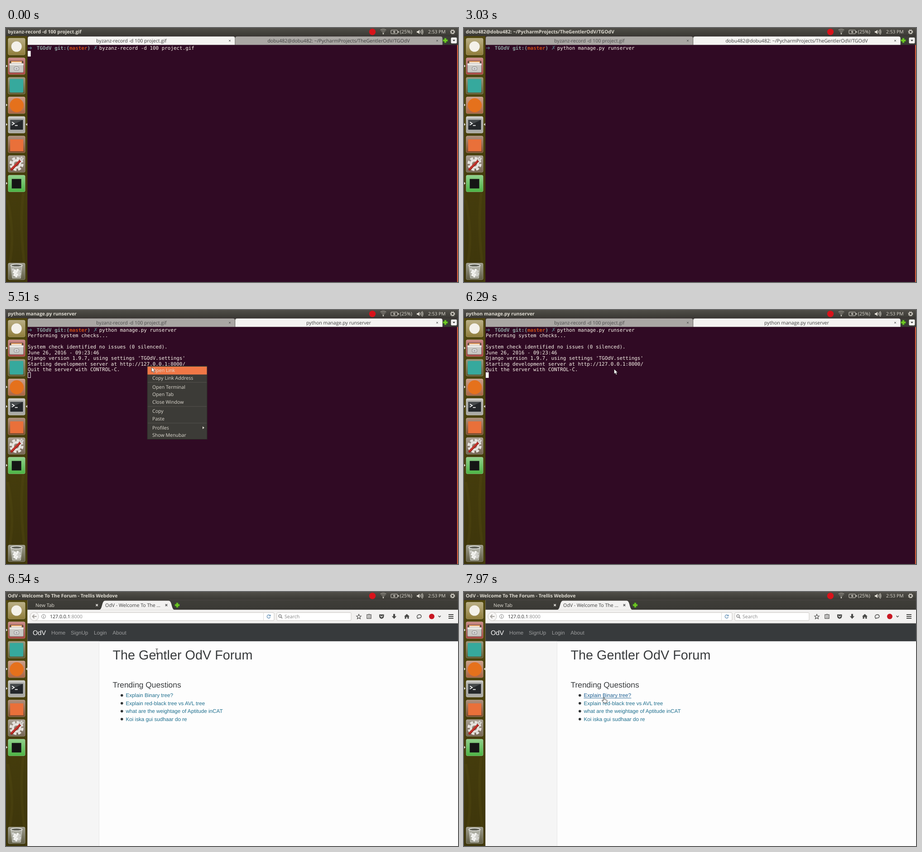
Animation of 998x561 px, one loop 8 s. Source, as an HTML page:

```html
<!DOCTYPE html>
<html lang="en">
<head>
<meta charset="utf-8">
<title>Desktop recording</title>
<style>
html, body { margin: 0; width: 100%; height: 100%; overflow: hidden; background: #300a24; }
svg { display: block; width: 100%; height: 100%; }
text { white-space: pre; text-rendering: geometricPrecision; }
.u { font: 10.6px "Open Sans", sans-serif; }
.b { font: bold 10.5px "Open Sans", sans-serif; fill: #dfdbd2; }
.m { font: 10.92px "DejaVu Sans Mono", monospace; fill: #fbf6ec; }
.s { font: 12px "DejaVu Sans", sans-serif; fill: #54747f; }
.h { font: 11.69px "Liberation Sans", sans-serif; fill: #373a3c; }
</style>
</head>
<body>
<svg id="stage" viewBox="0 0 998 561" preserveAspectRatio="none"></svg>
<script>
const LOOP = 8000, CELL = 6.5755, ROW = 12.42, LEFT = 48;
const PATH = 'dobu482@dobu482: ~/PycharmProjects/TheGentlerOdV/TGOdV';
const RECORD = 'byzanz-record -d 100 project.gif';
const SERVE = 'python manage.py runserver';

const rect = (x, y, w, h, fill, more = '') =>
  `<rect x="${x}" y="${y}" width="${w}" height="${h}" fill="${fill}" ${more}/>`;
const disc = (x, y, r, fill, more = '') => `<circle cx="${x}" cy="${y}" r="${r}" fill="${fill}" ${more}/>`;
const path = (d, fill, more = '') => `<path d="${d}" fill="${fill}" ${more}/>`;
const line = (d, color, w = 1, more = '') => path(d, 'none', `stroke="${color}" stroke-width="${w}" ${more}`);
const text = (x, y, str, cls, more = '') => `<text x="${x}" y="${y}" class="${cls}" ${more}>${str}</text>`;
const group = (id, body, more = '') => `<g id="${id}" ${more}>${body}</g>`;
const at = (x, y, body) => `<g transform="translate(${x} ${y})">${body}</g>`;
const cross = (x, y, r, color, w) =>
  line(`M${x - r} ${y - r}l${2 * r} ${2 * r}m0 ${-2 * r}l${-2 * r} ${2 * r}`, color, w);
const plus = (x, y) => line(`M${x - 5.5} ${y}h11m-5.5 -5.5v11`, '#3f8f1c', 4.8) +
  line(`M${x - 4.7} ${y}h9.4m-4.7 -4.7v9.4`, '#74c924', 3);
const gear = (x, y, r, color, w, dash) => disc(x, y, r, 'none', `stroke="${color}" stroke-width="${w}"`) +
  disc(x, y, r + w, 'none', `stroke="${color}" stroke-width="${w}" stroke-dasharray="${dash}"`);
const vgrad = (id, a, b) => `<linearGradient id="${id}" x1="0" y1="0" x2="0" y2="1">
  <stop offset="0" stop-color="${a}"/><stop offset="1" stop-color="${b}"/></linearGradient>`;

const defs = `<defs>${vgrad('bar', '#504e48', '#3a3934')}${vgrad('dock', '#51480f', '#3d350b')}
  ${vgrad('gloss', '#ffffff66', '#ffffff08')}${vgrad('head', '#3f3e39', '#3a3935')}</defs>`;

function panel() {
  return rect(0, 0, 998, 17.6, 'url(#bar)') +
    text(4, 12.4, '', 'b', 'id="title"') +
    disc(809, 8.6, 7.2, '#d8131b') +
    [3, 5.5, 8].map(r => line(`M${833 - r * .8} ${12.5 - r}q${r * .8} ${-r * .45} ${r * 1.6} 0`, '#a9a59c', 1.2)).join('') +
    disc(833, 12.5, 1.4, '#dfdbd2') +
    rect(850, 4.7, 14.5, 8, 'none', 'stroke="#dfdbd2" rx="1"') + rect(865.5, 7, 1.8, 3.4, '#dfdbd2') +
    path('M858 5.6l-4 3.6h3l-1 2.9 4.5-3.9h-3z', '#dfdbd2') +
    text(869.8, 12.4, '(25%)', 'u', 'fill="#dfdbd2"') +
    path('M907 7h2.5l3.5-3v9.5l-3.5-3H907z', '#dfdbd2') +
    line('M914.8 6.2q2 2.5 0 5m2-7q3.4 4.5 0 9m2-10.5q4 6 0 12', '#dfdbd2', 1.1) +
    text(932, 12.4, '2:53 PM', 'u', 'fill="#dfdbd2" style="font-size:10.3px"') +
    gear(986, 8.6, 3.2, '#dfdbd2', 1.5, '1.9 1.79');
}

// Launcher icons are drawn in a 38 by 38 box.
const tile = (y, fill, body) => at(4.2, y, rect(.5, .5, 37.5, 37, fill, 'rx="3"') +
  rect(.5, .5, 37.5, 37, 'url(#gloss)', 'rx="3" stroke="#ffffff55" stroke-width=".8"') + body);

function launcher() {
  const files = rect(4, 7, 30, 9, '#5a4a40', 'rx="2"') + rect(7, 8, 24, 6, '#f3a25c') +
    rect(8, 10, 22, 3, '#f7efe2') + rect(3.5, 13, 31, 20, '#c9c8c4', 'rx="2" stroke="#77736d"') +
    rect(3.5, 13, 31, 4, '#e9e8e5') + rect(14, 21, 10, 7, '#eee', 'rx="1" stroke="#777"') + rect(16.5, 24, 5, 1.7, '#777');
  const shell = rect(3, 6, 32.5, 26, '#cfcfca', 'rx="2" stroke="#888"') + rect(5, 8, 28.5, 22, '#24272a') +
    path('M5 8h28.5L5 22z', '#45494b') + line('M9 13l5 3.3-5 3.3M15.5 20.5h6', '#fff', 1.7);
  const tools = gear(19, 19, 8, '#e6e3df', 5, '6.4 3.81') +
    line('M8 31L27 12', '#a51f1a', 5, 'stroke-linecap="round"') + line('M8 30.5L25 13', '#d9473d', 1.5) +
    line('M33.5 5.5q-1 6-5.5 5.5-2-4 3.5-7.5', '#d8d6d2', 3);
  let balls = '';
  for (let i = 0; i < 13; i++)
    balls += disc(11.5 + i * 5 % 16, 15 + (i * 7 % 13) * 1.2, 2.7, i % 3 ? '#f1f1ee' : '#d0d0cb');
  const bin = path('M7 6h24l-3 28H10z', '#b9bab2aa', 'stroke="#d4d5cf" stroke-width="1"') + balls +
    `<ellipse cx="19" cy="6" rx="12.5" ry="3" fill="#5d5e55" stroke="#e8e8e3" stroke-width="1.5"/>`;
  const mark = y => path(`M0 ${y - 3}l3.4 3-3.4 3z`, '#d9d6cc');
  return rect(0, 17.6, 47.5, 543.4, 'url(#dock)') +
    line('M4 380Q20 460 8 520M38 365Q28 450 46 560', '#66591a', 6, 'opacity=".18"') +
    tile(22, '#8d7a36', disc(19, 19, 11.5, '#f4f1ea')) +
    tile(65.2, '#a8403c', files) +
    tile(108.4, '#5a552c', rect(4, 4, 30, 30, '#36a99d', 'rx="2"')) +
    tile(151.6, '#a9603d', disc(19.5, 19, 15.3, '#e5711c')) +
    tile(194.8, '#aaa9a3', shell) +
    tile(238, '#7a4728', rect(5, 8, 29, 26, '#e9703a')) +
    tile(281.2, '#72624f', tools) +
    tile(324.4, '#47b23f', rect(8.5, 9, 21, 21, '#151515')) +
    tile(518.6, '#5d5a41', bin) +
    [84, 170, 213, 343].map(mark).join('') + path('M47 -3l-3.4 3 3.4 3z', '#e4e1d8', 'id="focus"');
}

const rowY = r => 48 + r * ROW;
const colX = c => LEFT + c * CELL;
const mono = (c, r, str, more) => text(colX(c), rowY(r), str, 'm', more);
const bold = color => `style="font-weight:bold;fill:${color}"`;

function terminal() {
  const tab = (x, w, id) => path(`M${x} 37.2v-14.5q0-4 4-4h${w - 8}q4 0 4 4v14.5z`, '#aaa7a4', `id="${id}"`);
  const output = ['Performing system checks...', '', 'System check identified no issues (0 silenced).',
    'June 26, 2016 - 09:23:46', "Django version 1.9.7, using settings 'TGOdV.settings'",
    'Starting development server at http://127.0.0.1:8000/', 'Quit the server with CONTROL-C.'];
  return rect(47.5, 17.6, 951, 543.4, '#300a24') + rect(47.5, 17.6, 951, 19.7, 'url(#head)') +
    tab(48, 457.5, 'tabA') + tab(506.2, 457.5, 'tabB') +
    text(276.8, 32, RECORD, 'u', 'id="labelA" text-anchor="middle"') +
    text(734.5, 32, PATH, 'u', 'id="labelB" text-anchor="middle" fill="#3c3c3c"') +
    cross(494, 28, 1.9, '#555', 1) + cross(952, 28, 1.9, '#555', 1) + plus(970, 27.5) +
    rect(982.5, 21, 13, 13, '#f4f3f1', 'rx="2"') + path('M986 26h6l-3 3.5z', '#444') +
    rect(996, 37.5, 2, 524, '#d9623c') +
    text(LEFT, rowY(0), '➜', 's') + mono(3, 0, 'TGOdV', bold('#8ba3a0')) + mono(9, 0, 'git:(', bold('#8ba3a0')) +
    mono(14, 0, 'master', bold('#cb4b16')) + mono(20, 0, ')', bold('#8ba3a0')) + text(colX(22), rowY(0), '✗', 's') +
    mono(24, 0, '', 'id="command"') +
    group('check', mono(0, 1, output[0])) +
    group('output', output.slice(1).map((s, i) => mono(0, i + 2, s)).join('')) +
    line(`M${colX(31)} 124.3h${CELL * 22}`, '#fbf6ec', .8, 'id="underline"') +
    rect(0, 0, CELL, ROW, '#fff', 'id="block"');
}

function menu() {
  const items = ['Open Link', 'Copy Link Address', '', 'Open Terminal', 'Open Tab', 'Close Window', '',
    'Copy', 'Paste', '', 'Profiles', 'Show Menubar'];
  let y = 125, body = rect(312, 123.5, 132, 162, '#3c3b37', 'stroke="#2a2925"') +
    rect(312.5, 125, 131, 17.5, '#f07746', 'id="hot"');
  for (const item of items) {
    if (item) body += text(323, y + 12.2, item, 'u', 'fill="#dfdbd2"');
    else body += line(`M313 ${y + 2}h130`, '#55534d');
    y += item ? 16.4 : 4;
  }
  return body + path('M434 257l4 3-4 3z', '#dfdbd2');
}

function browser() {
  const ink = '#4a4a48';
  const field = (x, w) => rect(x, 45.5, w, 17.5, '#fff', 'rx="2" stroke="#c4c1bd" stroke-width=".9"');
  const nav = ['Home', 'SignUp', 'Login', 'About'].map((s, i) =>
    text([100, 143, 194, 235.3][i], 94, s, 'h', `id="nav${i}"`)).join('');
  const topics = ['Explain Binary tree?', 'Explain red-black tree vs AVL tree',
    'what are the weightage of Aptitude inCAT', 'Koi iska gui sudhaar do re'];
  const list = topics.map((s, i) => disc(255.8, 228.2 + i * 17.53, 2.8, '#2f3234') +
    text(264.4, 232.2 + i * 17.53, s, 'h', `id="topic${i}" style="fill:#20708f"`)).join('');
  const icons = line('M779 49.3l1.5 3.5 3.7.3-2.8 2.5.9 3.7-3.3-2-3.3 2 .9-3.7-2.8-2.5 3.7-.3z', ink, 1.2) +
    rect(797, 50, 9, 8.5, 'none', `stroke="${ink}" stroke-width="1.3"`) + line('M799 53h5.5m-5.5 3h5.5M801.5 48v2', ink, 1.2) +
    path('M824 49.5h10.5v4q-.5 5-5.3 5.7-4.7-.7-5.2-5.7z', ink) + line('M826.5 52.5l2.7 2.7 2.7-2.7', '#fff', 1.4) +
    path('M855 48.5h4v5h3.2l-5.2 5.7-5.2-5.7h3.2z', ink) +
    path('M885 48.5l6 5.5h-1.5v5h-3.2v-3.5h-2.6v3.5h-3.2v-5H879z', ink) +
    line('M909 58.5q-3.5-5 1-8 6-2 7 3-.5 4.5-6 4z', ink, 1.4) +
    disc(940, 54, 6, '#c81722') + line('M954.5 52.5l2.7 2.7 2.7-2.7', ink, 1.4) +
    line('M977 50h11m-11 4h11m-11 4h11', ink, 2);
  const page = rect(47.5, 69.3, 951, 39.5, '#373a3c') + rect(47.5, 108.8, 158, 452.2, '#f5f5f5') +
    rect(205.2, 108.8, .8, 452.2, '#e4e4e4') +
    text(59, 95.2, 'OdV', 'h', 'style="font-size:14.6px;fill:#fff"') + nav +
    text(235.5, 149, 'The Gentler OdV Forum', 'h', 'style="font-size:28.8px"') +
    text(235.5, 211, 'Trending Questions', 'h', 'style="font-size:17.4px"') + list +
    line('M264.4 234.3h105', '#1d5f92', .9, 'id="hover"') +
    group('status', rect(47.5, 547, 122, 15, '#f2f1f0', 'stroke="#bbb" stroke-width=".8"') +
      text(52, 557.5, '127.0.0.1:8000/login', 'u', 'fill="#333"'));
  return rect(47.5, 17.6, 951, 543.4, '#fdfdfd') + rect(47.5, 17.6, 951, 22, 'url(#head)') +
    text(65, 32.8, 'New Tab', 'u', 'fill="#dfdbd2"') + cross(200.7, 29, 2.2, '#f0eee9', 1.5) +
    path('M206 39.4C213 39 211 19.3 219 19.3H359C367 19.3 365 39 372 39.4z', '#f2f1f0') +
    text(219, 32.8, '', 'u', 'id="tabName" fill="#3c3c3c"') + cross(354, 29, 2.2, '#555', 1.5) + plus(378, 29) +
    rect(47.5, 39.3, 951, 29.4, '#f2f1f0') + rect(47.5, 68.6, 951, .7, '#b8b6b3') + field(62, 530) +
    disc(62.5, 54, 9.5, '#f7f6f5', 'stroke="#c4c1bd" stroke-width=".9"') +
    line('M67.5 54h-9m4-4l-4 4 4 4', '#a8a5a0', 1.9) +
    disc(83, 54, 4.4, 'none', 'stroke="#777" stroke-width=".9"') + line('M83 51.3v1.2m0 1v3.2', '#777', 1.2) +
    text(97, 57.8, '127.0.0.1<tspan fill="#8d8d8d">:8000</tspan>', 'u', 'fill="#222"') +
    line('M568.5 46v17', '#d5d2ce', .8) + line('M583 52.2a3.6 3.6 0 1 0 .4 3', '#6d97bb', 1.4) +
    path('M584.5 49.5v4h-4z', '#6d97bb') + field(598, 164) +
    disc(605, 53, 2.9, 'none', 'stroke="#777" stroke-width="1.3"') + line('M607 55.2l3 3', '#777', 1.6) +
    text(615, 57.8, 'Search', 'u', 'fill="#858585"') + icons + group('page', page);
}

function pointers() {
  const beam = 'M-2.5 -5.5q2 0 2.5 1 .5-1 2.5-1M0-4.5v9M-2.5 5.5q2 0 2.5-1 .5 1 2.5 1';
  return group('beam', line(beam, '#fff', 1.1, 'id="beamInk"')) +
    group('arrow', path('M0 0v10.6l2.5-2.2 1.9 4 1.9-.9-1.9-3.8h3.4z', '#fff', 'stroke="#222" stroke-width=".7"')) +
    group('hand', path('M-1.2 0q1.2-1 2 .2l.6 4.3 4 .8q2 .5 1.5 2.7l-1 4H-.3l-4-5.2q.2-1.6 2-.8l1.2 1.2z',
      '#fff', 'stroke="#222" stroke-width=".9"'));
}

const stage = document.getElementById('stage');
stage.innerHTML = defs + launcher() + group('terminal', terminal()) + group('menu', menu()) +
  group('browser', browser()) + panel() + group('mouse', pointers());
const parts = {};
stage.querySelectorAll('[id]').forEach(e => parts[e.id] = e);

const show = (id, on) => parts[id].setAttribute('visibility', on ? 'inherit' : 'hidden');
const set = (id, name, value) => parts[id].setAttribute(name, value);
const write = (id, str) => { if (parts[id].textContent !== str) parts[id].textContent = str; };
const within = (t, a, b) => t >= a && t < b;
const latest = (steps, t) => steps.reduce((v, [start, next]) => t >= start ? next : v, steps[0][1]);

const titles = [[0, RECORD], [1150, PATH], [3250, SERVE], [6340, 'New Tab - Trellis Webdove'],
  [6490, 'OdV - Welcome To The Forum - Trellis Webdove']];
const commands = [[0, RECORD], [1150, ''], [1580, 'reset'], [1810, 'git push origin HEAD'],
  [2170, 'git status'], [2460, SERVE]];
const route = [[3800, 422, 112], [4390, 302, 137], [4610, 302, 137], [4850, 311, 122], [5420, 311, 122],
  [5600, 331.5, 130.5], [6400, 331.5, 130.5], [6500, 333, 131], [6910, 333, 131], [7150, 250, 88],
  [7330, 212, 88], [7680, 300, 196], [7720, 300, 196], [7960, 309, 233]];

function mouseAt(t) {
  const i = route.findIndex(k => k[0] > t);
  if (i < 0) return route[route.length - 1].slice(1);
  if (!i) return route[0].slice(1);
  const [a, b] = [route[i - 1], route[i]];
  const p = (t - a[0]) / (b[0] - a[0]), e = p * p * (3 - 2 * p);
  return [a[1] + (b[1] - a[1]) * e, a[2] + (b[2] - a[2]) * e];
}

function drawTerminal(t) {
  const second = t >= 1150, command = latest(commands, t);
  set('tabA', 'fill', second ? '#aaa7a4' : '#f4f3f1');
  set('tabB', 'fill', second ? '#f4f3f1' : '#aaa7a4');
  set('labelA', 'fill', second || t >= 500 ? '#4a4a4a' : '#3c3c3c');
  write('labelB', t < 3250 ? PATH : SERVE);
  write('command', command);
  show('check', t >= 3760);
  show('output', t >= 4000);
  show('underline', within(t, 4780, 4990));
  show('menu', within(t, 4990, 6060));
  show('hot', within(t, 5460, 6060));

  const row = t < 1150 ? 1 : t < 3200 ? 0 : t < 3760 ? 1 : t < 4000 ? 2 : 8;
  const hollow = within(t, 4990, 6060), inset = hollow ? .5 : 0;
  set('block', 'x', colX(row ? 0 : 24 + command.length) + inset);
  set('block', 'y', 38.1 + row * ROW + inset);
  set('block', 'width', CELL - 2 * inset);
  set('block', 'height', ROW - 2 * inset);
  set('block', 'fill', hollow ? 'none' : '#fff');
  set('block', 'stroke', hollow ? '#fff' : 'none');
  show('block', !within(t, 450, 1070) && !within(t, 3030, 3200));
}

function drawBrowser(t, x, y) {
  const ready = t >= 6490, overNav = ready && within(y, 82, 98);
  const edges = [[100, 131], [143, 183], [194, 223], [235, 267]];
  const hit = overNav ? edges.findIndex(([a, b]) => x >= a && x <= b) : -1;
  const onTopic = t >= 7720 && y > 223;
  show('page', ready);
  write('tabName', ready ? 'OdV - Welcome To The …' : 'Connecting…');
  edges.forEach((_, i) => { parts['nav' + i].style.fill = i === hit ? '#c3c4c5' : '#9b9c9d'; });
  parts.topic0.style.fill = onTopic ? '#1d5f92' : '#20708f';
  show('hover', onTopic);
  show('status', within(t, 7200, 7740));
  return hit >= 0 || onTopic ? 'hand' : t < 6930 ? 'beam' : 'arrow';
}

function draw(t) {
  const web = t >= 6340, [x, y] = mouseAt(t);
  show('terminal', !web);
  show('browser', web);
  write('title', latest(titles, t));
  set('focus', 'transform', `translate(0 ${web ? 170 : 213})`);
  drawTerminal(t);
  const shape = web ? drawBrowser(t, x, y) : t < 4780 ? 'beam' : t < 4990 ? 'hand' : 'arrow';
  ['beam', 'arrow', 'hand'].forEach(id => show(id, id === shape));
  set('beamInk', 'stroke', web ? '#333' : '#fff');
  show('mouse', t >= 3800);
  set('mouse', 'transform', `translate(${x.toFixed(2)} ${y.toFixed(2)})`);
}

const start = performance.now();
function tick() {
  draw((performance.now() - start) % LOOP);
  requestAnimationFrame(tick);
}
tick();
</script>
</body>
</html>
```
